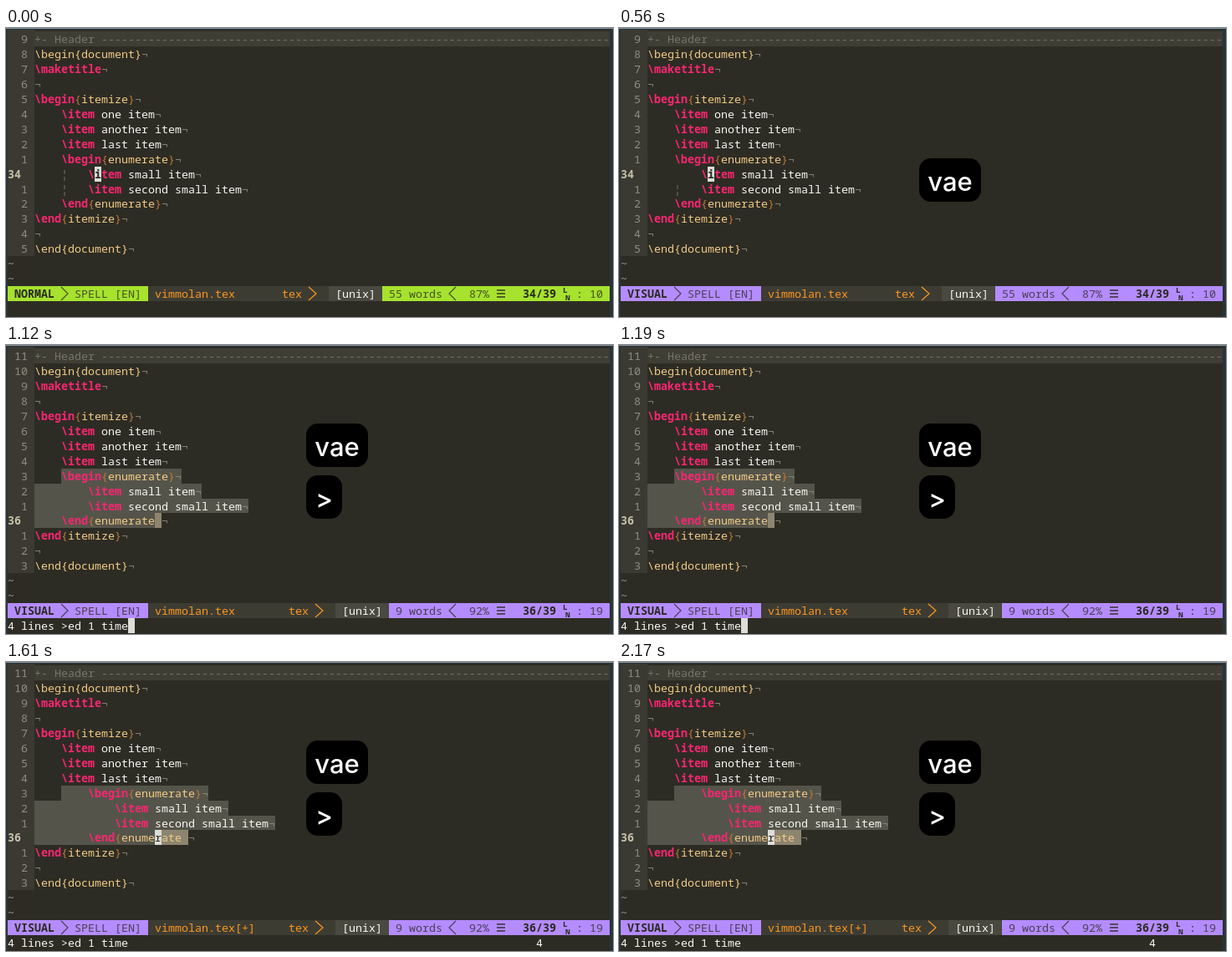
An HTML page for the animation above (2240 ms loop, 726 px wide and 346 px high).

```html
<!DOCTYPE html>
<html lang="en">
<head>
<meta charset="utf-8">
<title>Indenting a LaTeX environment</title>
<style>
  html, body { margin: 0; width: 100%; height: 100%; overflow: hidden; background: #2d2c24; }
  svg { display: block; width: 726px; height: 346px; }
  text { white-space: pre; font: 500 13.333px "Noto Sans Mono", "DejaVu Sans Mono", monospace; }
  .b { font-weight: 800; }
  .thin { font-weight: 400; }
  .key { font: 500 31px Inter, "Open Sans", sans-serif; fill: #fff; }
  .tiny { font-size: 9.5px; font-weight: 700; }
</style>
</head>
<body>
<svg id="stage" viewBox="0 0 726 346"></svg>
<script>
const CELL = 8, ROW = 17.95, LEFT = 2, TOP = 4, TEXT = 4, LOOP = 2240;
const C = {
  bg: '#2d2c24', gutter: '#3b3a32', fold: '#3f3e34', edge: '#27353c', rim: '#84949c',
  dim: '#77756a', mark: '#8b887c', num: '#8f8d80', tilde: '#a5a396', current: '#c4c0aa',
  pink: '#f92672', sand: '#f3cb86', brace: '#bd7a36', white: '#f8f8f2',
  select: '#55544a', tan: '#8d8570', cursor: '#dcdcd8', orange: '#fd971f',
  file: '#3d3c33', unix: '#4a4940', lime: '#a6e22e', purple: '#b48cff',
  ink: '#2b2a22', soft: 'rgba(43,42,34,.78)', black: '#000'
};

// Each step holds until the next one; values carry over.
const STEPS = [
  { at: 0, mode: 'NORMAL', keys: [], row: 9, guides: [9, 10] },
  { at: 350, mode: 'VISUAL', keys: ['v'], guides: [10] },
  { at: 420, keys: ['va'] },
  { at: 490, keys: ['vae'] },
  { at: 630, row: 11, guides: [], selected: true, count: true },
  { at: 1050, keys: ['vae', '>'] },
  { at: 1120, message: '4 lines >ed 1 time', prompt: true, count: false },
  { at: 1260, shift: 4, prompt: false, count: true, changed: true }
];
const states = [];
STEPS.forEach((s, i) => states.push({ shift: 0, ...states[i - 1], ...s }));

const colX = c => LEFT + c * CELL;
const rowY = r => Math.round(TOP + r * ROW);
const esc = s => s.replace(/&/g, '&amp;').replace(/</g, '&lt;').replace(/>/g, '&gt;');
const rect = (x, y, w, h, fill, rx = 0) =>
  `<rect x="${x}" y="${y}" width="${w}" height="${h}" rx="${rx}" fill="${fill}"/>`;
const cells = (r, c, n, fill) => rect(colX(c), rowY(r), n * CELL, rowY(r + 1) - rowY(r), fill);
const put = (r, c, s, fill, cls = '') =>
  `<text class="${cls}" x="${colX(c)}" y="${rowY(r) + 14}" fill="${fill}">${esc(s)}</text>`;
const stroke = (points, color, width = 1.2) =>
  `<polyline points="${points}" fill="none" stroke="${color}" stroke-width="${width}"/>`;

// A line is a start column and a list of [text, colour, class] runs.
const cmd = s => [s, C.pink, 'b'];
const env = (col, name, word) =>
  [col, cmd('\\' + name), ['{', C.brace], [word, C.sand], ['}', C.brace]];
const item = (col, s) => [col, cmd('\\item'), [' ' + s, C.white]];
const doc = name => [0, [`\\${name}{document}`, C.sand]];

function buildLines(shift) {
  return [
    [0, ['+- Header ' + '-'.repeat(76), C.dim, 'thin']],
    doc('begin'),
    [0, cmd('\\maketitle')],
    [0],
    env(0, 'begin', 'itemize'),
    item(4, 'one item'),
    item(4, 'another item'),
    item(4, 'last item'),
    env(4 + shift, 'begin', 'enumerate'),
    item(8 + shift, 'small item'),
    item(8 + shift, 'second small item'),
    env(4 + shift, 'end', 'enumerate'),
    env(0, 'end', 'itemize'),
    [0],
    doc('end')
  ];
}

const endOf = ([col, ...runs]) => runs.reduce((c, run) => c + run[0].length, col);

function drawLine([col, ...runs], r) {
  let out = '', c = col;
  for (const [s, fill, cls] of runs) {
    out += put(r, TEXT + c, s, fill, cls);
    c += s.length;
  }
  return r ? out + put(r, TEXT + c, '¬', C.mark) : out;
}

function drawSelection(lines) {
  let out = '';
  for (let r = 8; r < 11; r++) {
    const from = r === 8 ? 4 : 0;
    out += cells(r, TEXT + from, endOf(lines[r]) + 1 - from, C.select);
  }
  return out + cells(11, TEXT, 18, C.select);
}

function drawCursor(s) {
  const block = (r, c, ch, cls) => cells(r, c, 1, C.cursor) + put(r, c, ch, C.ink, cls);
  if (!s.selected) return block(9, TEXT + 9, 'i', 'b');
  if (s.prompt) return cells(11, TEXT + 18, 1, C.tan) + cells(18, 18, 1, C.cursor);
  if (!s.shift) return block(11, TEXT + 18, '}');
  return cells(11, TEXT + 19, 4, C.tan) + put(11, TEXT + 19, 'ate', C.sand) +
    block(11, TEXT + 18, 'r');
}

function drawStatus(s) {
  const r = 17, y = rowY(r), mid = y + 9;
  const color = s.mode === 'NORMAL' ? C.lime : C.purple;
  const words = s.selected ? '9 words' : '55 words';
  const right = 64 - words.length;
  const arrow = (c, w, col) =>
    stroke(`${colX(c)},${y + 1} ${colX(c) + w},${mid} ${colX(c)},${y + 17}`, col);
  let out = cells(r, 0, 21, color) + cells(r, 21, right - 8 - 21, C.file) +
    cells(r, right - 8, 8, C.unix) + cells(r, right, 90 - right, color);
  out += put(r, 1, s.mode, C.ink, 'b') + arrow(8, 8, C.soft) + put(r, 10, 'SPELL [EN]', C.soft);
  out += put(r, 22, 'vimmolan.tex' + (s.changed ? '[+]' : ''), C.orange);
  out += put(r, right - 15, 'tex', C.orange) + arrow(right - 11, 9, C.orange);
  out += put(r, right - 7, '[unix]', C.white);
  out += put(r, right + 1, words, C.soft);
  out += stroke(`538,${y + 1} 530,${mid} 538,${y + 17}`, C.soft);
  out += put(r, 69, s.selected ? '92%' : '87%', C.soft);
  for (const d of [-4, 0, 4]) out += stroke(`587,${mid + d} 597,${mid + d}`, C.ink, 1.4);
  out += put(r, 77, s.selected ? '36/39' : '34/39', C.ink, 'b');
  out += `<text class="tiny" x="666" y="${y + 8}" fill="${C.ink}">L</text>` +
    `<text class="tiny" x="669" y="${y + 17}" fill="${C.ink}">N</text>`;
  out += put(r, 85, ':', C.ink) + put(r, 87, s.selected ? '19' : '10', C.soft);
  if (s.message) out += put(18, 0, s.message, C.white);
  if (s.count) out += put(18, 79, '4', C.white);
  return out;
}

function drawKeys(keys) {
  const widths = { v: 40, va: 57, vae: 74, '>': 43 };
  return keys.map((k, i) => {
    const y = 156 - 62 * (keys.length - 1 - i), w = widths[k];
    return rect(359, y, w, 52, C.black, 14) +
      `<text class="key" x="${359 + w / 2}" y="${y + 39}" text-anchor="middle">${esc(k)}</text>`;
  }).join('');
}

function draw(s) {
  const lines = buildLines(s.shift);
  let out = rect(0, 0, 726, 346, C.edge) + rect(0, 0, 726, 1, C.rim) +
    rect(2, 2, 720, 344, C.bg) + rect(2, 2, 32, rowY(15) - 2, C.gutter) +
    cells(0, TEXT, 86, C.fold);
  if (s.selected) out += drawSelection(lines);
  lines.forEach((line, r) => {
    const here = r === s.row;
    const label = here ? String(25 + r) : String(Math.abs(r - s.row));
    out += put(r, here ? 0 : 3 - label.length, label, here ? C.current : C.num, here ? 'b' : 'thin');
    out += drawLine(line, r);
  });
  for (const r of s.guides) out += put(r, TEXT + 4, '¦', C.dim, 'thin');
  out += put(15, 0, '~', C.tilde) + put(16, 0, '~', C.tilde);
  return out + drawCursor(s) + drawStatus(s) + drawKeys(s.keys);
}

const stage = document.getElementById('stage');
const start = performance.now();
let shown;
function tick() {
  const t = (performance.now() - start) % LOOP;
  const state = states.filter(s => s.at <= t).pop();
  if (state !== shown) stage.innerHTML = draw(shown = state);
  requestAnimationFrame(tick);
}
tick();
</script>
</body>
</html>
```
